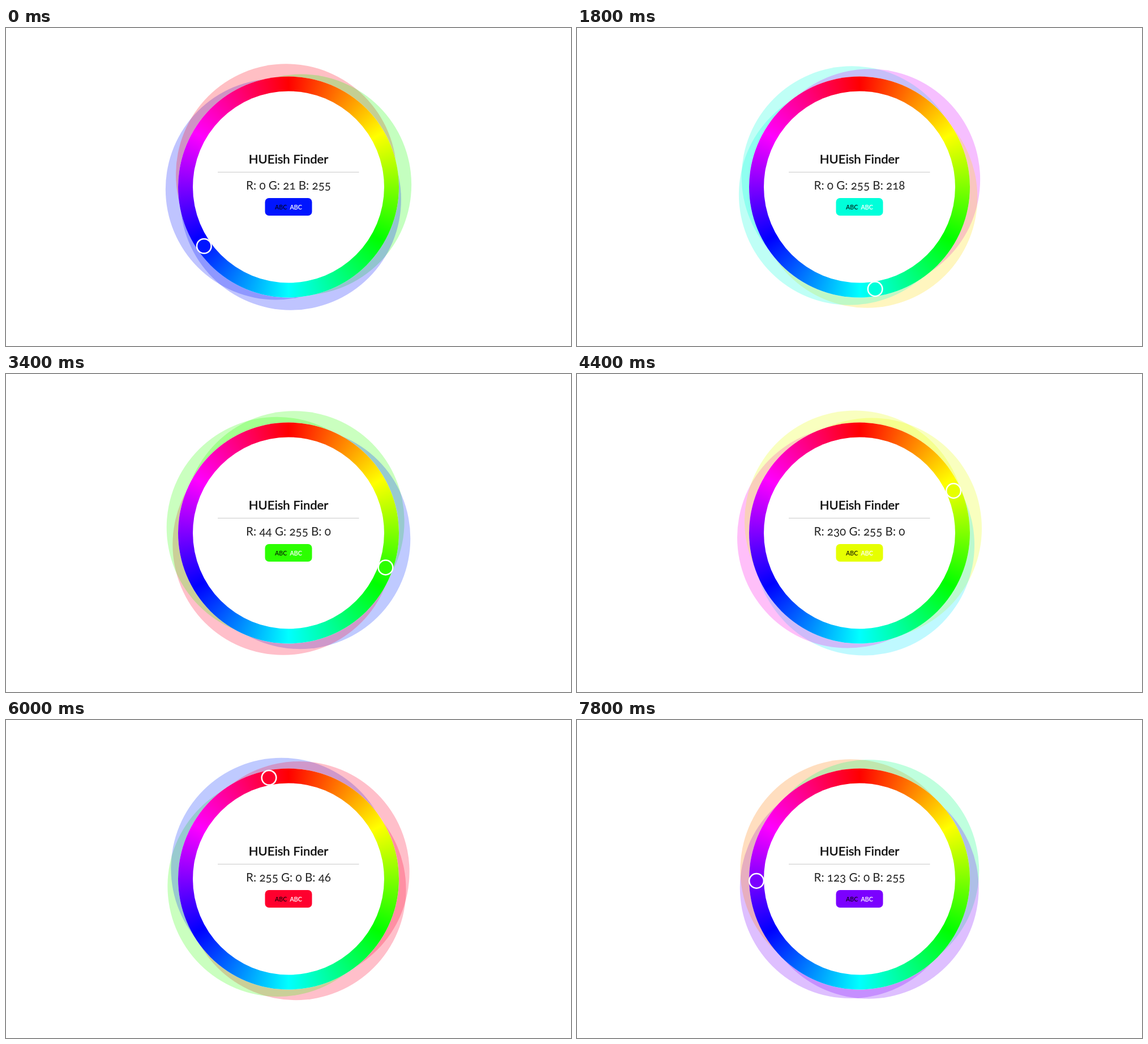
Animation, 998 px wide and 561 px high, one loop 8 s. Source, as an HTML page:

```html
<!DOCTYPE html>
<html lang="en">
<head>
<meta charset="utf-8">
<title>HUEish Finder</title>
<style>
  html, body {
    margin: 0;
    width: 100%;
    height: 100%;
    overflow: hidden;
    background: #fff;
  }
  #stage {
    position: absolute;
    left: 0;
    top: 0;
    width: 998px;
    height: 561px;
    overflow: hidden;
  }
  #ring {
    position: absolute;
    left: 304px;
    top: 85px;
    width: 390px;
    height: 390px;
    border-radius: 50%;
    transform: translateY(.5px);
    background: conic-gradient(red, yellow, lime, cyan, blue, magenta, red);
  }
  #ring::after {
    content: "";
    position: absolute;
    inset: 26px;
    border-radius: 50%;
    background: #fff;
  }
  svg {
    position: absolute;
    left: 0;
    top: 0;
    font-family: Raleway, Lato, "Open Sans", sans-serif;
  }
  .title { font-size: 22px; font-weight: 500; fill: #111; stroke: #111; stroke-width: .35px; }
  .value { font-size: 20.6px; fill: #222; font-variant-numeric: oldstyle-nums; }
  .sample { font-size: 10.7px; }
  .light { fill: #fff; stroke: #fff; stroke-width: .25px; }
</style>
</head>
<body>
<div id="stage">
  <div id="ring"></div>
  <svg width="998" height="561" viewBox="0 0 998 561">
    <text class="title" x="499" y="239" text-anchor="middle">HUEish Finder</text>
    <path d="M374 254.3H623.5" stroke="#d2d2d2" stroke-width="1.3"/>
    <text class="value" id="value" x="499" y="285" text-anchor="middle"></text>
    <rect id="swatch" x="457.5" y="300" width="83" height="31" rx="7"/>
    <text class="sample" x="475" y="319.7">ABC</text>
    <text class="sample light" x="501.5" y="319.7">ABC</text>
    <circle id="knob" r="12.8" stroke="#fff" stroke-width="2.5"/>
  </svg>
</div>
<script>
  const LOOP = 8000, STEP = 200;
  const CX = 499, CY = 280.5, TRACK = 182, SHIFT = 22.5;

  // Dragged hue: [time in ms, degrees clockwise from the top]
  const drag = [
    [0, 235.06], [1000, 199.06], [2600, 142.12], [4400, 65.88],
    [5400, 16], [6800, -45.88], [7800, -91.06]
  ];

  // Shadows, topmost first: [hue offset, angle offset]
  const shadows = [[0, 90], [-120, 0], [120, -90], [0, 180]];

  const $ = id => document.getElementById(id);
  const ring = $('ring'), knob = $('knob'), swatch = $('swatch'), value = $('value');
  const mod = (a, n) => (a % n + n) % n;

  function polar(deg, r) {
    const a = deg * Math.PI / 180;
    return [r * Math.sin(a), -r * Math.cos(a)];
  }

  function slope(i) {
    const [t0, h0] = drag[Math.max(i - 1, 0)];
    const [t1, h1] = drag[Math.min(i + 1, drag.length - 1)];
    return (h1 - h0) / (t1 - t0);
  }

  // Cubic Hermite curve through the drag points
  function hueAt(t) {
    let i = 0;
    while (i < drag.length - 2 && t >= drag[i + 1][0]) i++;
    const [t0, h0] = drag[i], [t1, h1] = drag[i + 1];
    const d = t1 - t0, u = (t - t0) / d, v = 1 - u;
    return h0 * v * v * (1 + 2 * u) + h1 * u * u * (3 - 2 * u)
      + d * u * v * (slope(i) * v - slope(i + 1) * u);
  }

  function rgb(hue) {
    return [0, 240, 120].map(offset => {
      const d = Math.abs(mod(hue + offset + 180, 360) - 180);
      return Math.round(255 * Math.min(1, Math.max(0, 2 - d / 60)));
    });
  }

  function draw(t) {
    const hue = hueAt(t), spin = 315 - hue;
    const [r, g, b] = rgb(hue), color = `rgb(${r},${g},${b})`;
    const [x, y] = polar(hue, TRACK);

    ring.style.boxShadow = shadows.map(([dh, da]) => {
      const [sx, sy] = polar(spin + da, SHIFT);
      return `${sx.toFixed(2)}px ${sy.toFixed(2)}px 0 rgba(${rgb(hue + dh)},.25)`;
    }).join(',');
    knob.setAttribute('cx', CX + x);
    knob.setAttribute('cy', CY + y);
    knob.setAttribute('fill', color);
    swatch.setAttribute('fill', color);
    value.textContent = `R: ${r} G: ${g} B: ${b}`;
  }

  const start = performance.now();
  function tick() {
    const t = (performance.now() - start) % LOOP;
    draw(Math.floor(t / STEP) * STEP);
    requestAnimationFrame(tick);
  }
  tick();
</script>
</body>
</html>
```
